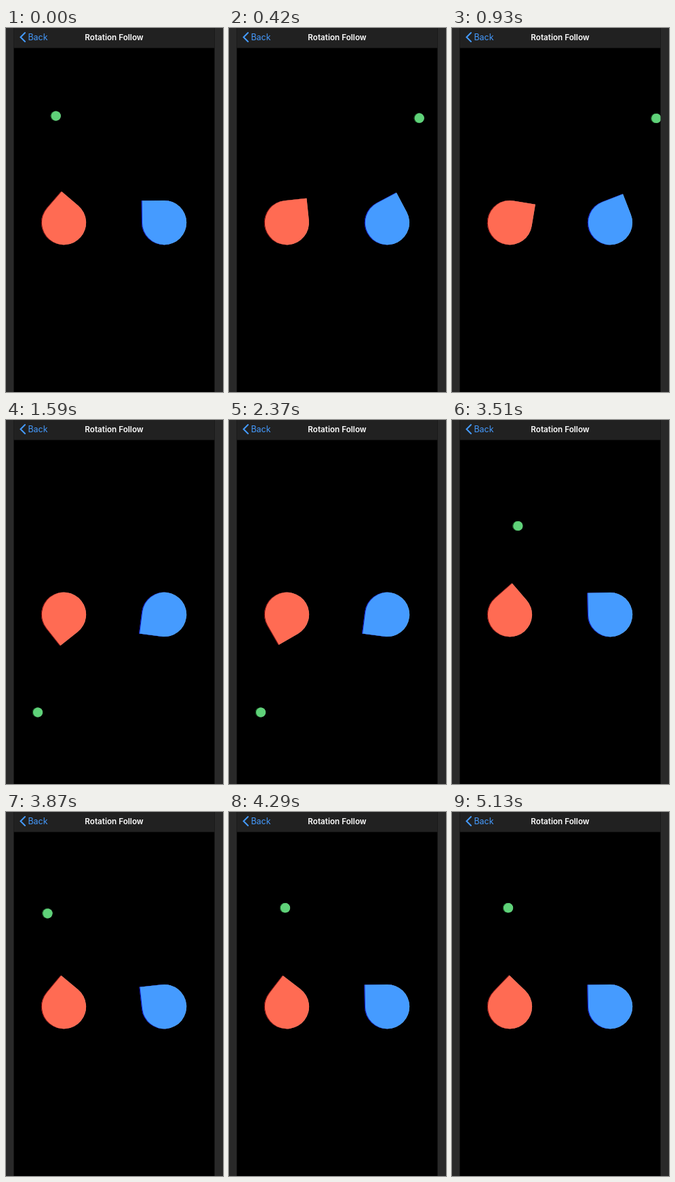
An HTML page for the animation above (5.16 s loop, 320 by 536 pixels).

```html
<!DOCTYPE html>
<html lang="en">
<head>
<meta charset="utf-8">
<title>Rotation Follow</title>
<style>
html, body { margin: 0; width: 100%; height: 100%; overflow: hidden; background: #000; }
svg { display: block; width: 320px; height: 536px; }
text { font-family: Inter, Roboto, sans-serif; }
.soft { filter: blur(.3px) drop-shadow(-.9px 0 .4px var(--left)) drop-shadow(.8px 0 .2px var(--right)); }
.red { fill: #ff6b53; --left: #800000; --right: #788080; }
.blue { fill: #459bff; --left: #0008c8; --right: #788080; }
.green { fill: #5fd279; --left: #064010; --right: #70a080; }
</style>
</head>
<body>
<svg viewBox="0 0 320 536">
  <defs><path id="drop" d="M0-46L23-23A32.6 32.6 0 1 1-23-23Z"/></defs>
  <rect width="320" height="536"/>
  <g class="soft red"><use id="red" href="#drop"/></g>
  <g class="soft blue"><use id="blue" href="#drop"/></g>
  <g class="soft green"><circle id="dot" r="7.1"/></g>
  <path d="M0 0H11.5V536H0ZM307.5 0H320V536H307.5Z" fill="#292929"/>
  <rect x="11.5" width="296" height="29.5" fill="#212121"/>
  <path d="M28 7L21.5 13.5L28 20" fill="none" stroke="#459bff" stroke-width="2" stroke-linecap="round"/>
  <text x="32.5" y="18" font-size="12.4" fill="#459bff">Back</text>
  <text x="159.5" y="17.8" font-size="11.7" font-weight="600" fill="#fff" text-anchor="middle">Rotation Follow</text>
</svg>
<script>
const LOOP = 5160, STEP = 5, LAG = 106;
const RED = { x: 85.5, y: 286.5 }, BLUE = { x: 233.5, y: 286.5 };

// The dot is dragged from stop to stop
const HOME = { x: 73.7, y: 129.5 };
const DRAGS = [
  { from: 30, to: 510, x: 301.3, y: 133 },
  { from: 930, to: 1500, x: 47, y: 430.5 },
  { from: 2760, to: 3180, x: 97.3, y: 156 },
  { from: 3510, to: 4000, x: 54, y: 148 },
  { from: 4170, to: 4285, x: 83, y: 141.2 }
];

const smooth = u => u * u * (3 - 2 * u);
const mix = (a, b, k) => a + (b - a) * k;

function dotAt(t) {
  let { x, y } = HOME;
  for (const d of DRAGS) {
    const k = smooth(Math.max(0, Math.min(1, (t - d.from) / (d.to - d.from))));
    x = mix(x, d.x, k);
    y = mix(y, d.y, k);
  }
  return { x, y };
}

const bearing = (c, p) => Math.atan2(p.x - c.x, c.y - p.y) * 180 / Math.PI;

// Red turns towards the dot the short way, closing the gap exponentially
function laggedBearing(c, t) {
  const gain = 1 - Math.exp(-STEP / LAG);
  let angle = bearing(c, HOME);
  for (let s = STEP; s <= t; s += STEP) {
    const gap = bearing(c, dotAt(s)) - angle;
    angle += gain * (gap - 360 * Math.round(gap / 360));
  }
  return angle;
}

function place(id, { x, y }, angle = 0) {
  document.getElementById(id).setAttribute('transform', `translate(${x} ${y}) rotate(${angle})`);
}

function draw() {
  const t = performance.now() % LOOP, dot = dotAt(t);
  place('dot', dot);
  place('red', RED, laggedBearing(RED, t));
  place('blue', BLUE, bearing(BLUE, dot));
  requestAnimationFrame(draw);
}
draw();
</script>
</body>
</html>
```
